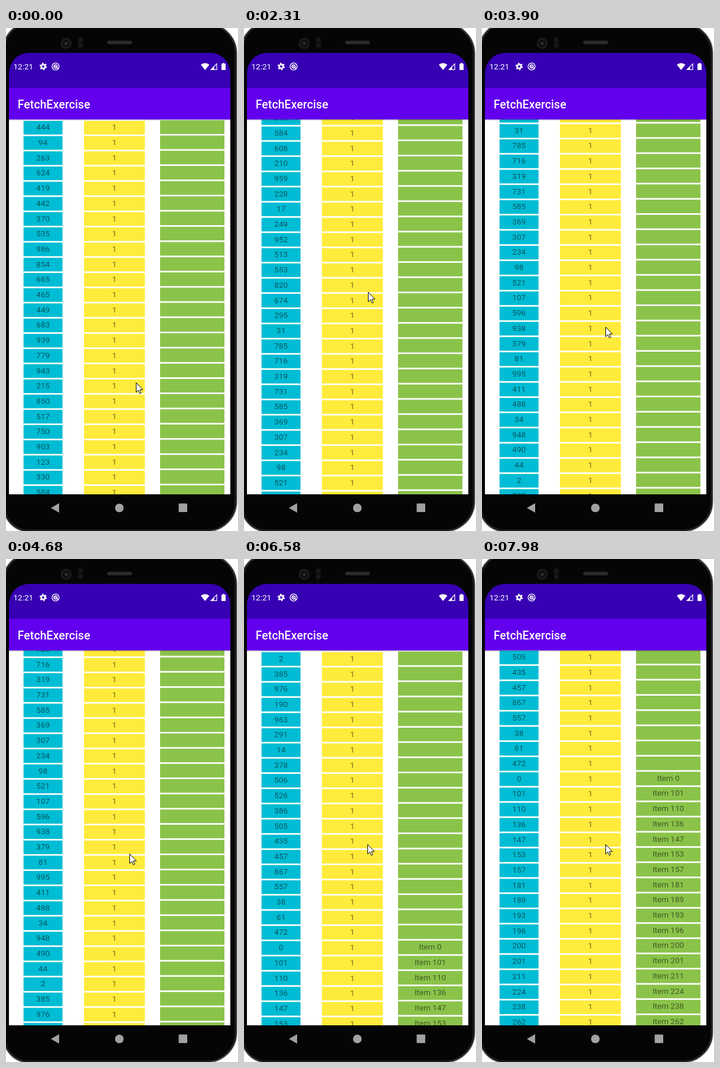
Write an HTML page that moves like this. It is 393x850 px and loops after 8000 ms.

```html
<!DOCTYPE html>
<html lang="en">
<head>
<meta charset="utf-8">
<title>List scroll</title>
<style>
  html, body { margin: 0; width: 100%; height: 100%; overflow: hidden; background: #fff; }
  svg { display: block; width: 393px; height: 850px; font-family: Roboto, sans-serif; }
  #list text { font-size: 13.5px; text-anchor: middle; fill: #000; fill-opacity: .54; }
</style>
</head>
<body>
<svg viewBox="0 0 393 850">
  <defs>
    <clipPath id="view"><rect x="5" y="154" width="375" height="634"/></clipPath>
    <linearGradient id="shade" x2="0" y2="1">
      <stop offset="0" stop-opacity=".3"/><stop offset="1" stop-opacity="0"/>
    </linearGradient>
  </defs>

  <!-- phone body -->
  <path d="M-4 34A42 42 0 0 1 38 -8H340A51 51 0 0 1 391 43V800A51 51 0 0 1 340 851H38A42 42 0 0 1 -4 809Z" fill="#050505" stroke="#6b6b6b" stroke-width="1.500"/>
  <path d="M340 -5.500A48 48 0 0 1 388.500 43V800A48 48 0 0 1 340 848.500H38A39 39 0 0 1 -1.500 809V34A39 39 0 0 1 38 -5.500" fill="none" stroke="#2a2a2a" stroke-width="1.500"/>
  <circle cx="102" cy="26" r="9.500" fill="#1a1a1a"/>
  <circle cx="102" cy="26" r="6" fill="#0e0e0e"/>
  <circle cx="102" cy="26" r="2.500" fill="#303030"/>
  <rect x="121.500" y="15" width="9" height="20" rx="4.500" fill="#121212"/>
  <circle cx="126" cy="20" r="2" fill="#202020"/>
  <circle cx="126" cy="30" r="2" fill="#202020"/>
  <rect x="171.500" y="21.500" width="42" height="6" rx="3" fill="#2b2b2b"/>

  <!-- screen -->
  <path d="M5 101V76A34 34 0 0 1 39 42H346A34 34 0 0 1 380 76V101Z" fill="#3700b3"/>
  <rect x="5" y="154" width="375" height="634" fill="#fff"/>
  <g clip-path="url(#view)"><g id="list"></g></g>
  <rect x="5" y="154" width="375" height="3" fill="url(#shade)"/>
  <rect x="5" y="101" width="375" height="53.500" fill="#6200ee"/>
  <text x="19.700" y="135.600" font-size="19.400" font-weight="500" letter-spacing=".13" fill="#fff">FetchExercise</text>

  <!-- status bar -->
  <g fill="#fff">
    <text x="12.500" y="70.200" font-size="13.500">12:21</text>
    <g fill="none" stroke="#fff">
      <circle cx="63" cy="65" r="3.300" stroke-width="2.600"/>
      <circle cx="63" cy="65" r="5.200" stroke-width="2" stroke-dasharray="2.700 2.745"/>
      <circle cx="84" cy="65" r="5.900" stroke-width="1.400"/>
      <circle cx="84" cy="65" r="2.800" stroke-width="1.500"/>
      <path d="M82 63L88 69" stroke-width="1.500"/>
    </g>
    <path d="M330 62Q337.200 56.500 344.500 62L337.200 71Z"/>
    <path d="M357 60.500V70.300H347.200Z" fill="none" stroke="#fff" stroke-width="1.200"/>
    <path d="M352.500 65V70.500H347Z"/>
    <path d="M365 60.500H367V59H370V60.500H372V71H365Z"/>
  </g>

  <!-- navigation -->
  <g fill="#a1a1a1">
    <path d="M76 811L90 803V819Z"/>
    <circle cx="192" cy="811" r="7.300"/>
    <rect x="292.500" y="803.500" width="14.500" height="14.500" rx="1"/>
  </g>

  <path id="cursor" d="M.5 .5V16.600L4.200 13.100L6.600 18.700L9 17.700L6.700 12.200H11.800Z" fill="#fff" stroke="#000" stroke-linejoin="round"/>
</svg>
<script>
const LOOP = 8000, PITCH = 25.7, REFRESH = 135;

// row labels; from "0" on the items are named
const ids = `444 94 263 624 419 442 370 535 986 854 665 465 449 683 939 779 943 215
  850 517 750 903 123 330 584 608 210 959 228 17 249 952 513 553 820 674 295 31
  785 716 319 731 585 369 307 234 98 521 107 596 938 379 81 995 411 488 34 948
  490 44 2 385 976 190 963 291 14 378 506 526 386 505 435 457 867 557 38 61 472
  0 101 110 136 147 153 157 181 189 193 196 200 201 211 224 238 262`.split(/\s+/);
const firstNamed = ids.indexOf("0");

const columns = [
  { x: 29.7, width: 66, fill: "#00bcd4", dy: 0, label: id => id },
  { x: 132, width: 103.3, fill: "#ffeb3b", dy: 0, label: () => "1" },
  { x: 261, width: 109, fill: "#8bc34a", dy: -1, label: (id, i) => i < firstNamed ? "" : "Item " + id }
];

// time and scroll offset
const scrolls = [
  [300, 0], [1360, 267.2], [3120, 898.8], [4680, 992], [4980, 1020], [5140, 1020],
  [5910, 1240], [6580, 1541.5], [7280, 1755], [7600, 1755], [7980, 1826.8]
];

// time and cursor position
const moves = [[300, 220, 599], [1360, 212, 371], [3120, 209, 511], [4680, 209, 498], [5910, 209, 482]];

const list = document.getElementById("list");
const cursor = document.getElementById("cursor");

function add(tag, attrs, text = "") {
  const el = document.createElementNS("http://www.w3.org/2000/svg", tag);
  for (const k in attrs) el.setAttribute(k, attrs[k]);
  el.textContent = text;
  list.append(el);
}

ids.forEach((id, i) => {
  for (const { x, width, fill, dy, label } of columns) {
    const y = 157 + i * PITCH + dy;
    add("rect", { x, y, width, height: 23, fill });
    const text = label(id, i);
    if (text) add("text", { x: x + width / 2, y: y + 15.3 }, text);
  }
});

// values at time t, advancing in even steps of about one refresh
function at(keys, t) {
  const n = keys.findIndex(k => k[0] > t);
  if (n === 0) return keys[0].slice(1);
  if (n < 0) return keys[keys.length - 1].slice(1);
  const [t0, ...a] = keys[n - 1], [t1, ...b] = keys[n];
  const steps = Math.round((t1 - t0) / REFRESH);
  const f = Math.floor((t - t0) / (t1 - t0) * steps) / steps;
  return a.map((v, i) => v + (b[i] - v) * f);
}

function draw(now) {
  const t = now % LOOP + 0.5;
  const [scroll] = at(scrolls, t);
  const [x, y] = at(moves, t).map(Math.round);
  list.setAttribute("transform", `translate(0 ${-scroll})`);
  cursor.setAttribute("transform", `translate(${x} ${y})`);
}

const start = performance.now();
function loop() {
  draw(performance.now() - start);
  requestAnimationFrame(loop);
}
loop();
</script>
</body>
</html>
```
